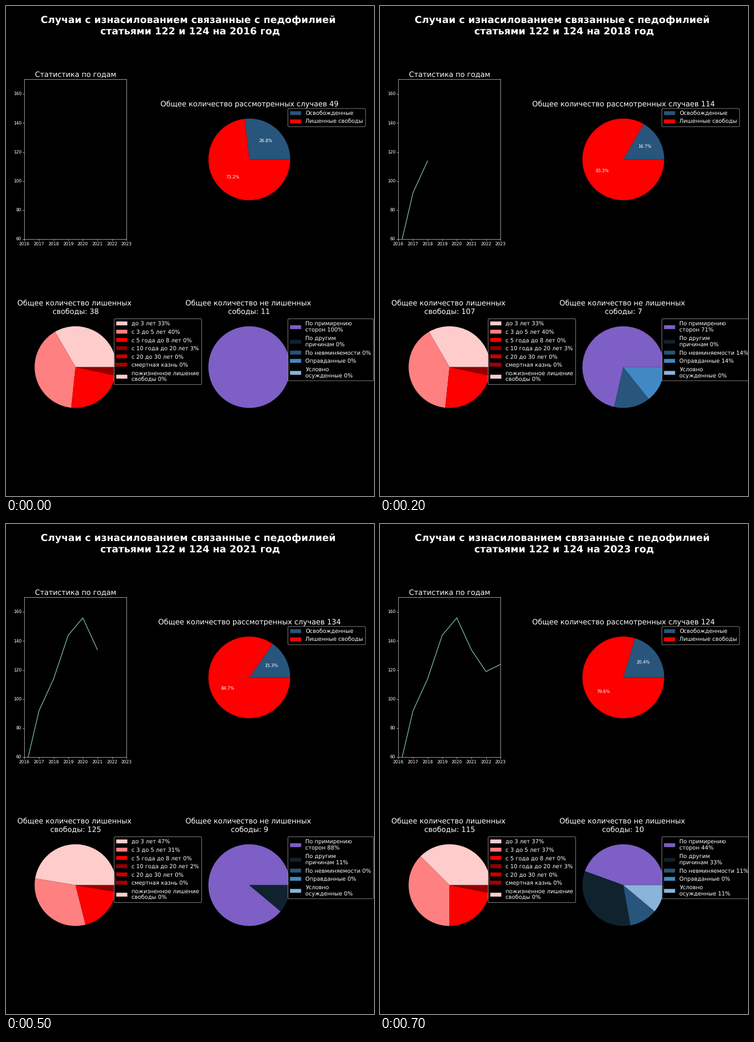
Write a matplotlib script that moves like this. It is 648 by 864 pixels and loops after 0.8 s.

```python
import numpy as np
import matplotlib.pyplot as plt
from matplotlib.animation import FuncAnimation

plt.style.use("dark_background")
plt.rcParams.update({
    "font.family": "DejaVu Sans",
    "text.hinting": "none",
    "path.snap": False,
})

YEARS = range(2016, 2024)
TOTAL = [49, 92, 114, 144, 156, 134, 119, 124]

# Key years; the years between are interpolated.
KEY_YEARS = [2016, 2018, 2019, 2020, 2021, 2023]
FREED = [11, 7, 15.5, 14, 9, 9.5]
FREED_PERCENT = [26.8, 16.7, 36.4, 34.1, 15.3, 20.4]
REASONS = {
    "По примирению\nсторон": [1, 5, 5, 11, 8, 4],
    "По другим\nпричинам": [0, 0, 2, 1, 1, 3],
    "По невминяемости": [0, 1, 4, 1, 0, 1],
    "Оправданные": [0, 1, 4, 1, 0, 0],
    "Условно\nосужденные": [0, 0, 1, 0, 0, 1],
}
SHORT_TERMS_SINCE = {2016: 10, 2019: 11, 2021: 18, 2022: 12}
TERM_LABELS = [
    "до 3 лет", "с 3 до 5 лет", "с 5 года до 8 лет", "с 10 года до 20 лет",
    "с 20 до 30 лет", "смертная казнь", "пожизненное лишение\nсвободы",
]

STEEL, RED = "#28557b", "#ff0000"
TERM_COLORS = ["#ffcccc", "#ff8080", RED, "#930000", "#cc0000", "#a60000"]
REASON_COLORS = ["#7d5fc5", "#10222e", STEEL, "#4289c4", "#8ab4d9"]

fig, axes = plt.subplots(2, 2, figsize=(12, 16), dpi=54)
fig.subplots_adjust(left=0.05, right=0.8, bottom=0.1, top=0.85,
                    wspace=0.7, hspace=0.3)
line_ax, verdict_ax, term_ax, reason_ax = axes.flat


def at_year(year, values):
    return np.interp(year, KEY_YEARS, values)


def round_half_up(x):
    return int(x + 0.5)


def reason_shares(year):
    counts = np.array(list(REASONS.values()))
    return [at_year(year, row) for row in counts / counts.sum(axis=0)]


def term_shares(year):
    start = max(y for y in SHORT_TERMS_SINCE if y <= year)
    counts = np.array([SHORT_TERMS_SINCE[start], 12, 7, 1, 0, 0, 0])
    return counts / counts.sum()


def percent_labels(names, shares):
    return [f"{name} {int(100 * share)}%" for name, share in zip(names, shares)]


def draw_pie(ax, values, colors, labels, title, legend_y=1.0, autopct=None):
    wedges = ax.pie(values, colors=colors, autopct=autopct,
                    textprops={"fontsize": 10})[0]
    ax.set_title(title, fontsize=17)
    legend = ax.legend(wedges, labels, loc="upper left", fontsize=13,
                       bbox_to_anchor=(0.85, legend_y))
    legend.get_frame().set_snap(False)


def draw_line(count):
    line_ax.plot(YEARS[:count], TOTAL[:count])
    line_ax.set(xlim=(2016, 2023), ylim=(60, 170),
                xticks=YEARS, yticks=range(60, 161, 20))
    line_ax.tick_params(labelsize=10)
    line_ax.set_title("Статистика по годам", fontsize=17)


def update(i):
    year, total = YEARS[i], TOTAL[i]
    for ax in axes.flat:
        ax.clear()
    fig.suptitle("Случаи с изнасилованием связанные с педофилией \n"
                 f"статьями 122 и 124 на {year} год",
                 fontsize=23, fontweight="bold")
    draw_line(i + 1)

    freed = at_year(year, FREED)
    freed_percent = at_year(year, FREED_PERCENT)
    draw_pie(verdict_ax, [freed_percent, 100 - freed_percent], [STEEL, RED],
             ["Освобожденные", "Лишенные свободы"],
             f"Общее количество рассмотренных случаев {total}",
             legend_y=1.025, autopct="%1.1f%%")

    terms = term_shares(year)
    shown = terms.copy()
    shown[2] = 0  # this legend entry always reads 0%
    draw_pie(term_ax, terms, TERM_COLORS, percent_labels(TERM_LABELS, shown),
             "Общее количество лишенных \n"
             f"свободы: {round_half_up(total - freed)}")

    reasons = reason_shares(year)
    draw_pie(reason_ax, reasons, REASON_COLORS,
             percent_labels(REASONS, reasons),
             "Общее количество не лишенных \n"
             f"сободы: {round_half_up(freed)}")
    return []


anim = FuncAnimation(fig, update, frames=len(YEARS), interval=100, repeat=True)
plt.show()
```
